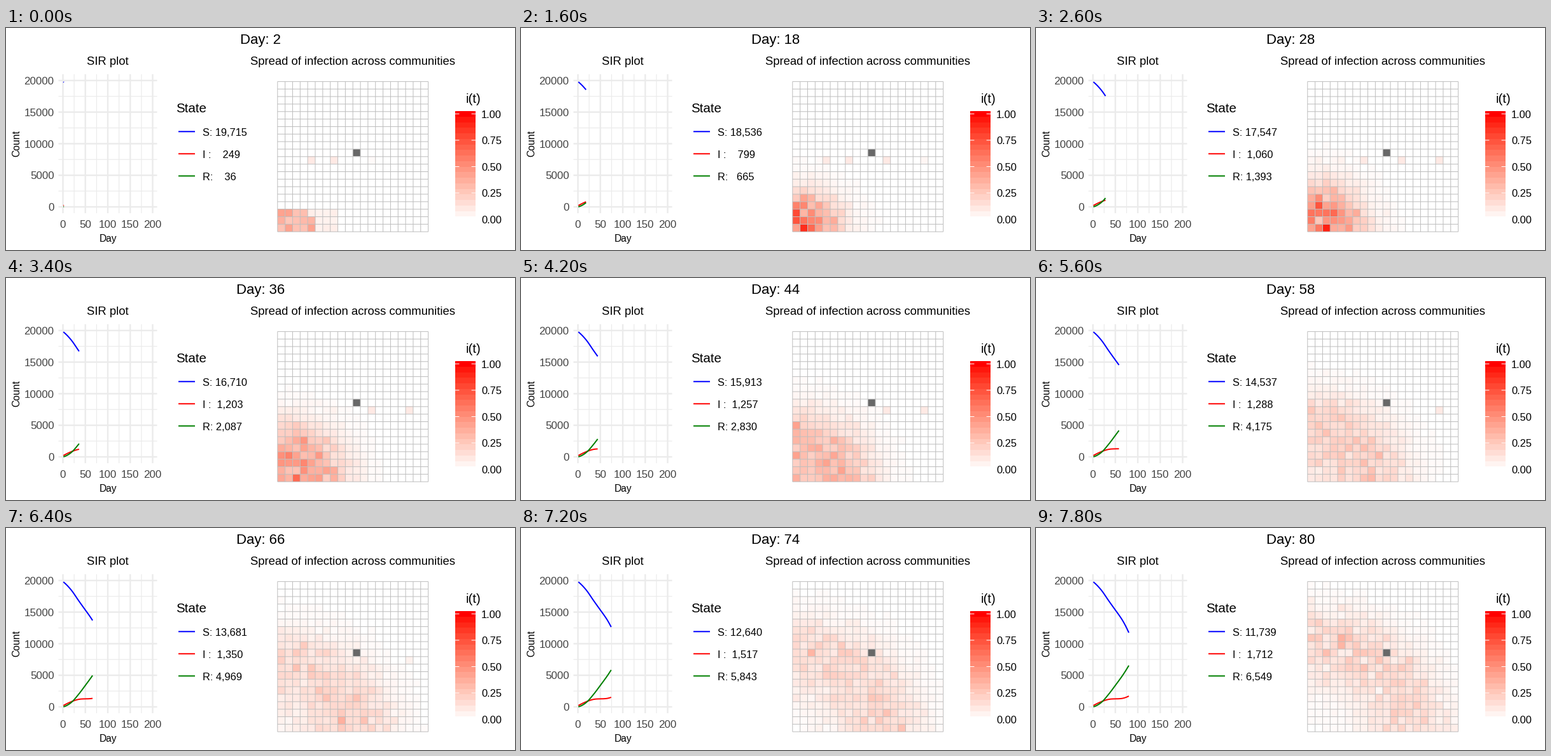
Recreate the animation shown at these times as a matplotlib script. Size 800 px wide and 350 px high, loop 8000 ms.

```python
import numpy as np
import matplotlib.pyplot as plt
from matplotlib.animation import FuncAnimation
from matplotlib.patches import Rectangle

plt.rcParams["font.family"] = "Liberation Sans"
W, H, DPI = 800, 350, 100
PT = 72 / DPI
N = 20
POP, CELL_POP = 20000, 50

fig = plt.figure(figsize=(W / DPI, H / DPI), dpi=DPI, facecolor="white")
ax = fig.add_axes([0, 0, 1, 1])
ax.axis("off")


def text(x, y, s, px, ha="left", color="black", **kw):
    return ax.text(x, y, s, fontsize=px * PT, ha=ha, color=color, **kw)


def line(xs, ys, px, color, z=2):
    return ax.plot(xs, ys, color=color, lw=px * PT, zorder=z, snap=False,
                   solid_capstyle="butt")[0]


# Epidemic totals: smooth curves through a few key days
KEY_DAYS = np.array([2, 18, 36, 50, 58, 66, 80])
S_KEYS = [19715, 18536, 16710, 15321, 14537, 13681, 11739]
I_KEYS = [249, 799, 1203, 1272, 1288, 1350, 1712]


def smooth(t, xs, ys):
    """Cubic Hermite curve through the key points."""
    ys = np.array(ys, float)
    m = np.gradient(ys, xs, edge_order=2)
    k = np.clip(np.searchsorted(xs, t, side="right") - 1, 0, len(xs) - 2)
    h = xs[k + 1] - xs[k]
    u = (t - xs[k]) / h
    return ((1 + 2 * u) * (1 - u) ** 2 * ys[k] + u * (1 - u) ** 2 * h * m[k]
            + u * u * (3 - 2 * u) * ys[k + 1] + u * u * (u - 1) * h * m[k + 1])


days = np.arange(1, 81)
S = np.rint(smooth(days, KEY_DAYS, S_KEYS)).astype(int)
I = np.rint(smooth(days, KEY_DAYS, I_KEYS)).astype(int)
R = POP - S - I

# Infection share per community: a noisy ring that spreads from one corner
LOCKED = (9, 10)
OUTPOST_ROW, OUTPOST_COLS = 10, [4, 7, 12, 17]
NOISE_STEP = 8
row, col = np.mgrid[0:N, 0:N]
up = N - 1 - row
radius = np.hypot((col + .5) * .92, (up + .5) * 1.05)
rng = np.random.default_rng(12)
noise = rng.gamma(10, 1 / 10, (12, N, N))
seed_block = np.where(col + (up == 2) < 5, .34, .07) * (up < 3) * (col < 8)
seed_block = seed_block * rng.uniform(.75, 1.25, (N, N))


def shares(day):
    crest = .2 * max(day - 18, 0)
    inner = min(9, 13.5 - .1 * day)
    outer = min(4.8, 3 + .12 * day)
    gap = radius - crest
    wave = np.exp(-(gap / np.where(gap < 0, inner, outer)) ** 2)
    wave += .02 * np.exp(-np.maximum(gap, 0) / 5)
    k, u = divmod(day / NOISE_STEP, 1)
    k = int(k)
    wave *= noise[k] * (1 - u) + noise[k + 1] * u
    wave *= I[day - 1] / CELL_POP / wave.sum()
    start = np.clip((18 - day) / 16, 0, 1)
    v = wave * (1 - start) + seed_block * start
    for x in OUTPOST_COLS:
        pulse = .11 * np.exp(-((day - 2.8 * x + 4) / 24) ** 4)
        v[OUTPOST_ROW, x] = max(v[OUTPOST_ROW, x], pulse)
    return np.clip(np.rint(v * CELL_POP) / CELL_POP, 0, 1)


def reds(v):
    """White through salmon to red."""
    v = np.asarray(v, float)
    return np.stack([np.ones_like(v), (1 - v) ** .82, (1 - v) ** 1.05], axis=-1)


def heat(day):
    rgb = reds(shares(day))
    rgb[LOCKED] = .41
    return rgb


# SIR panel
def px_x(day):
    return 89.5 + .705 * np.asarray(day)


def px_y(count):
    return 282 - .00996 * np.asarray(count)


LEFT, RIGHT, TOP, BOTTOM = 82.5, 237.5, 72.8, 292
GREY, TICK = "#ebebeb", "#444444"
for d in range(25, 200, 50):
    line([px_x(d)] * 2, [TOP, BOTTOM], 1.2, GREY, 1)
for n in range(2500, 20000, 5000):
    line([LEFT, RIGHT], [px_y(n)] * 2, 1.2, GREY, 1)
for d in range(0, 201, 50):
    line([px_x(d)] * 2, [TOP, BOTTOM], 2.4, GREY, 1)
    text(px_x(d), 315, str(d), 17, "center", TICK)
for n in range(0, 20001, 5000):
    line([LEFT, RIGHT], [px_y(n)] * 2, 2.4, GREY, 1)
    text(75.5, px_y(n) + 6.2, str(n), 17, "right", TICK)

text(160, 58, "SIR plot", 18.5, "center")
text(160, 336.5, "Day", 15.5, "center")
text(17, 182, "Count", 15.7, "center", va="center", rotation=90)
title = text(400, 24.5, "", 22.1, "center")

# State legend
text(267, 133, "State", 20.5)
curves, labels = [], []
for k, color in enumerate(["blue", "red", "green"]):
    y = 163.3 + 35 * k
    line([271, 297], [y, y], 2, color)
    labels.append(text(309.3, y + 6.5, "", 16.4))
    curves.append(line([], [], 2, color, 3 + k))

# Community grid
GX, GY, SIZE = 426.8, 84.4, 236.8
text(545, 58, "Spread of infection across communities", 18.45, "center")
cells = ax.imshow(heat(2), extent=[GX, GX + SIZE, GY + SIZE, GY],
                  interpolation="nearest", aspect="auto", zorder=1)
for p in np.linspace(0, SIZE, N + 1):
    line([GX + p] * 2, [GY, GY + SIZE], 1, "#bebebe")
    line([GX, GX + SIZE], [GY + p] * 2, 1, "#bebebe")

# Colour bar
BX, BY, BW, BIN = 706, 131, 32, 8.75
for k in range(20):
    ax.add_patch(Rectangle((BX, BY + k * BIN), BW, BIN, lw=0, antialiased=False,
                           facecolor=reds(1 - k / 19), zorder=1))
text(722.5, 118, "i(t)", 20.5)
for v in np.linspace(0, 1, 5):
    y = BY + BIN * (.5 + 19 * (1 - v))
    line([BX, BX + 6.4], [y, y], 1, "white")
    line([BX + BW - 6.4, BX + BW], [y, y], 1, "white")
    text(747, y + 6.3, f"{v:.2f}", 16.5)

ax.set_xlim(0, W)
ax.set_ylim(H, 0)


def draw(i):
    day = 2 + 2 * i
    title.set_text(f"Day: {day}")
    xs = px_x(days[:day])
    for curve, data in zip(curves, (S, I, R)):
        curve.set_data(xs, px_y(data[:day]))
    for label, head, data, width in zip(labels, ("S:", "I :", "R:"),
                                        (S, I, R), (7, 7, 6)):
        label.set_text(head + f"{data[day - 1]:,}".rjust(width))
    cells.set_data(heat(day))
    return [title, cells, *curves, *labels]


anim = FuncAnimation(fig, draw, frames=40, interval=200, repeat=True,
                     repeat_delay=0, blit=False)
plt.show()
```
